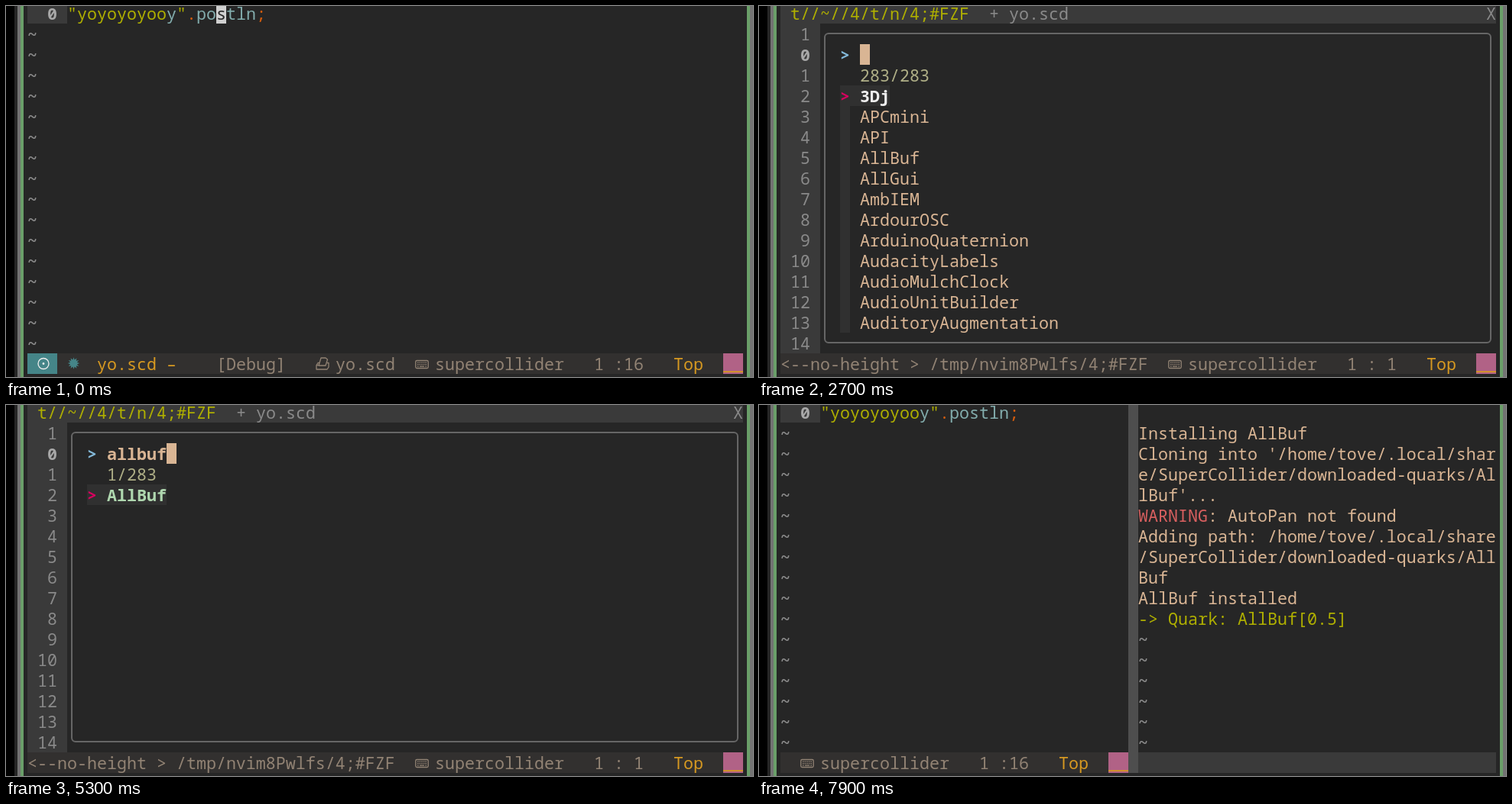
These frames come from a looping animation (977 px wide and 486 px high, 8000 ms). An HTML page:

```html
<!DOCTYPE html>
<html lang="en">
<head>
<meta charset="utf-8">
<title>Editor session</title>
<style>
  html, body { margin: 0; width: 100%; height: 100%; overflow: hidden; background: #262626; }
  svg { display: block; width: 977px; height: 486px; }
  text {
    font: 21.667px "Noto Sans Mono", "DejaVu Sans Mono", monospace;
    font-variant-ligatures: none;
    white-space: pre;
  }
  .b { font-weight: 700; }
</style>
</head>
<body>
<svg id="stage" viewBox="0 0 977 486"></svg>
<script>
const LOOP = 8000, CELL = 13, LINE = 27, LEFT = 28, TOP = -4;
const C = {
  bg: '#262626', panel: '#3a3a3a', bar: '#32302f', item: '#303030', split: '#4e4e4e',
  dim: '#8a8a8a', num: '#a8a8a8', status: '#928374', sand: '#d9b594', olive: '#afaf00',
  teal: '#458588', blue: '#83adad', orange: '#d79921', rust: '#d65d0e', pink: '#b16286',
  cursor: '#d0d0d0', white: '#eeeeee', match: '#87af87', matchOn: '#afd7af'
};
const stage = document.getElementById('stage');

const X = col => LEFT + col * CELL;
const Y = row => TOP + row * LINE;
const range = (from, to) => Array.from({ length: to - from + 1 }, (_, i) => from + i);

const rect = (x, y, w, h, fill) => `<rect x="${x}" y="${y}" width="${w}" height="${h}" fill="${fill}"/>`;
const cells = (col, row, n, fill) => rect(X(col), Y(row), n * CELL, LINE, fill);
const escapeText = s => s.replace(/&/g, '&amp;').replace(/</g, '&lt;');
const span = (s, fill) => `<tspan fill="${fill}">${escapeText(s)}</tspan>`;
const line = (col, row, spans, bold) =>
  `<text x="${X(col)}" y="${Y(row) + 21.5}"${bold ? ' class="b"' : ''}>${spans}</text>`;
const text = (col, row, s, fill, bold) => line(col, row, span(s, fill), bold);
const tildes = (col, from) => range(from, 16).map(r => text(col, r, '~', C.dim, true)).join('');

// Icons
function keyboard(col, color) {
  const x = X(col);
  return `<g fill="none" stroke="${color}" stroke-width="1.3">
    <rect x="${x + .8}" y="464.5" width="16.4" height="10" rx="1.5"/>
    <path d="M${x + 3} 467.2h12M${x + 3} 469.6h12" stroke-dasharray="1.6 1"/>
    <path d="M${x + 3} 472.2h1.6m1.4 0h6m1.4 0h1.6"/></g>`;
}

function printer(col) {
  const x = X(col);
  return `<path d="M${x + 5} 467.5h-2l-2 3v5.5h14l2-3v-5.5h-2M${x + 1} 470.5h4M${x + 4} 471l3-10h6l2.5 2-2.5 8z"
    fill="none" stroke="${C.status}" stroke-width="1.3" stroke-linejoin="round"/>`;
}

function star(cx, cy) {
  const points = range(0, 23).map(i => {
    const r = i % 2 ? 4.6 : 7.8, a = i * Math.PI / 12;
    return `${(cx + r * Math.sin(a)).toFixed(1)},${(cy - r * Math.cos(a)).toFixed(1)}`;
  });
  return `<polygon points="${points.join(' ')}" fill="${C.teal}"/>`;
}

// Shared parts
const frame = () =>
  rect(0, 0, 977, 486, C.bg) + rect(0, 0, 11, 486, '#000') +
  rect(15, 0, 4, 486, '#727272') + rect(19, 0, 4, 486, '#6a9f69') +
  rect(969, 0, 4, 486, '#6a9f69') + rect(973, 0, 4, 486, '#727272');

const statusTail = (col, position) =>
  keyboard(col, C.status) + text(col + 2, 17, 'supercollider', C.status) +
  text(col + 18, 17, position, C.status) + text(col + 26, 17, 'Top', C.orange) +
  cells(col + 31, 17, 2, C.pink) + text(col + 31, 17, '__', C.orange);

function code(cursorOn) {
  const pieces = span('"yoyoyoyoo', C.olive) + span('y', C.blue) + span('"', C.olive) +
    span('.', C.rust) + span('po', C.blue) + span('s', cursorOn ? C.bg : C.blue) +
    span('tln', C.blue) + span(';', C.rust);
  return cells(0, 0, 4, C.panel) + text(2, 0, '0', C.num, true) +
    (cursorOn ? cells(19, 0, 1, C.cursor) : '') + line(4, 0, pieces) + tildes(0, 1);
}

// Scenes
function editor(commandCol) {
  const command = commandCol !== undefined;
  const mode = command
    ? cells(0, 17, 3, C.orange) + keyboard(1, C.white)
    : cells(0, 17, 3, C.teal) +
      `<circle cx="49" cy="468.5" r="7" fill="none" stroke="${C.white}" stroke-width="1.3"/>
       <circle cx="49" cy="468.5" r="1.4" fill="${C.white}"/>`;
  return code(!command) + cells(0, 17, 72, C.bar) + mode + star(88.5, 468) +
    text(7, 17, 'yo.scd –', C.orange) + text(19, 17, '[Debug]', C.status) +
    printer(29) + text(31, 17, 'yo.scd', C.status) + statusTail(39, '1 :16') +
    (command ? cells(commandCol, 18, 1, C.cursor) : '');
}

const opening = ['3Dj', 'APCmini', 'API', 'AllBuf', 'AllGui', 'AmbIEM', 'ArdourOSC', 'ArduinoQuaternion',
  'AudacityLabels', 'AudioMulchClock', 'AudioUnitBuilder', 'AuditoryAugmentation'];
const startingWithA = ['API', 'AllBuf', 'AllGui', 'AmbIEM', 'adclib', 'APCmini', 'arduino', 'atk-sc3',
  'autogui', 'ArdourOSC', 'astronomy', 'Automation'];
const deeper = ['AllBuf', 'AllGui', 'adclib', 'MathLib', 'ScaleTools', 'GlobalTime', 'PatternCalls',
  'AudacityLabels', 'AudioMulchClock', 'AudioUnitBuilder', 'ParallelAutomationEnvelope'];
const counts = { '': 283, a: 141, al: 62, all: 18 };

// Positions of the query's letters in a name, or null when it does not match.
function fuzzy(name, query) {
  const hits = [];
  let from = 0;
  for (const ch of query) {
    const i = name.toLowerCase().indexOf(ch, from);
    if (i < 0) return null;
    hits.push(i);
    from = i + 1;
  }
  return hits;
}

function results(query) {
  const pool = query === '' ? opening : query === 'a' ? startingWithA : deeper;
  return pool.filter(name => fuzzy(name, query)).map((name, i) => {
    const row = 4 + i, on = i === 0, hits = fuzzy(name, query);
    const spans = [...name].map((ch, k) =>
      span(ch, hits.includes(k) ? (on ? C.matchOn : C.match) : (on ? C.white : C.sand))).join('');
    return cells(6, row, on ? 2 + name.length : 1, C.item) +
      (on ? text(6, row, '>', '#d7005f', true) : '') + line(8, row, spans, on);
  }).join('');
}

function finder(query) {
  const numbers = range(1, 16).map(row => {
    const n = Math.abs(row - 2);
    return text(n > 9 ? 1 : 2, row, String(n), n ? C.dim : C.num, !n);
  }).join('');
  const content = query === undefined ? '' :
    text(6, 2, '>', '#83b8d8', true) + text(8, 2, query, C.sand, true) +
    cells(8 + query.length, 2, 1, C.sand) +
    text(8, 3, `${counts[query] || 1}/283`, '#afaf87') + results(query);
  return rect(LEFT, 0, 936, 23, C.panel) + rect(LEFT, 23, 52, 432, C.panel) +
    text(1, 0, 't//~//4/t/n/4;#FZF', C.olive) + text(21, 0, '+ yo.scd', C.dim) +
    text(71, 0, 'X', C.dim) + numbers +
    `<rect x="86" y="36" width="871" height="405" rx="5" fill="none" stroke="#666" stroke-width="2"/>` +
    content + cells(0, 17, 72, C.bar) +
    text(0, 17, '<--no-height > /tmp/nvim8Pwlfs/4;#FZF', C.status) + statusTail(39, '1 : 1');
}

const log = ['Installing AllBuf', "Cloning into '/home/tove/.local/shar", 'e/SuperCollider/downloaded-quarks/Al',
  "lBuf'...", 'WARNING: AutoPan not found', 'Adding path: /home/tove/.local/share',
  '/SuperCollider/downloaded-quarks/All', 'Buf', 'AllBuf installed', '-> Quark: AllBuf[0.5]'];

function logLine(s, i) {
  const head = s.startsWith('WARNING') ? 7 : 0;
  const color = s.startsWith('->') ? C.olive : C.sand;
  return line(36, i + 1, span(s.slice(0, head), '#d75f5f') + span(s.slice(head), color));
}

const splitView = (shown, cursorOn) =>
  code(cursorOn) + rect(X(35), 0, CELL, 482, C.split) +
  log.slice(0, shown).map(logLine).join('') + tildes(36, shown + 1) +
  cells(0, 17, 35, C.bar) + statusTail(2, '1 :16') + cells(36, 17, 36, C.panel);

const timeline = [
  [0, () => editor()],
  [500, () => editor(1)],
  [800, () => editor(2)],
  [1700, () => editor(3)],
  [1900, () => editor(4)],
  [2000, () => editor(5)],
  [2100, () => editor(6)],
  [2300, () => editor(7)],
  [2600, () => finder()],
  [2700, () => finder('')],
  [4700, () => finder('a')],
  [4800, () => finder('al')],
  [4900, () => finder('all')],
  [5100, () => finder('allb')],
  [5200, () => finder('allbu')],
  [5300, () => finder('allbuf')],
  [5700, () => editor()],
  [6200, () => splitView(0, true)],
  [6300, () => splitView(4, true)],
  [6800, () => splitView(9, true)],
  [6900, () => splitView(10, false)],
  [7400, () => splitView(10, true)],
  [7900, () => splitView(10, false)]
];

let current = -1;
function render(ms) {
  const index = timeline.findLastIndex(([start]) => start <= ms);
  if (index === current) return;
  current = index;
  stage.innerHTML = frame() + timeline[index][1]();
}

const origin = performance.now();
function tick() {
  render((performance.now() - origin) % LOOP);
  requestAnimationFrame(tick);
}
tick();
</script>
</body>
</html>
```
